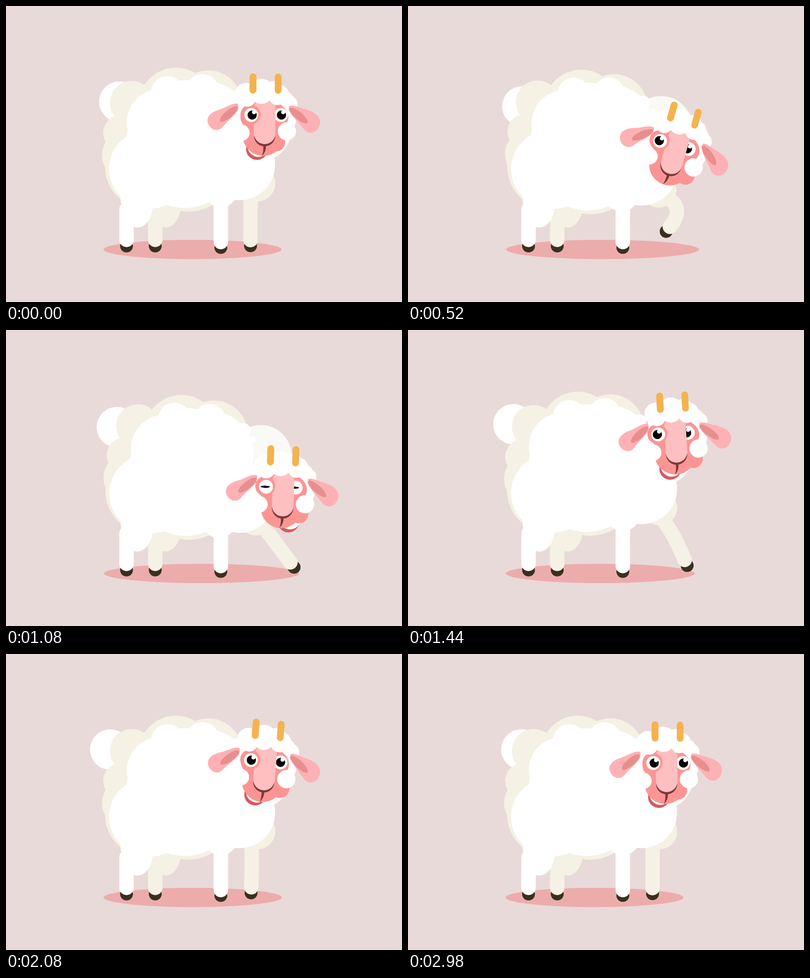
Recreate the animation shown at these times as an HTML page. Size 800 px wide and 600 px high, loop 3000 ms.

```html
<!DOCTYPE html>
<html lang="en">
<head>
<meta charset="utf-8">
<title>Sheep</title>
<style>
html, body { margin: 0; width: 100%; height: 100%; overflow: hidden; background: #e8dad9; }
svg { display: block; width: 100vw; height: 100vh; }
svg * { animation: 3s ease-in-out infinite; }

.white { fill: #fff; }
.cream { fill: #f5f1e4; }
.salmon { fill: #fb9594; }
.ear { fill: #fdb1b4; }
.inner { fill: #e88e8f; }
.horn { fill: #f4b34f; }
.hoof { fill: #38301f; }
.leg { fill: none; stroke: #fff; stroke-width: 29.3; stroke-linecap: round; }
.far { stroke: #f5f1e4; }

#shadow { animation-name: shadow; }
#body { transform-origin: 275px 335px; animation-name: lean; }
#tail { animation-name: wag; animation-timing-function: linear; }
#neck { animation-name: neck; }
#foreleg { animation-name: foreleg; }
#forehoof { animation-name: forehoof; }
#thigh { animation-name: thigh; }
#hindleg { animation-name: hindleg; }
#hindhoof { animation-name: hindhoof; }
#head { transform-origin: 522px 240px; animation-name: carry, tilt; }
#mouth { animation-name: chew; }
#chin { animation-name: chin; }
.turn { animation-name: turn; }
.eye { --turn: -7.8px; }
.horns { --turn: -4px; }
.look { --turn: -3.5px; }
.blink { transform-origin: 525px 221px; animation-name: blink; }

@keyframes shadow {
  0%, 72%, 100% { cx: 376.7px; rx: 179.8px; }
  17.33% { cx: 393px; rx: 195px; }
  31%, 37% { cx: 395px; rx: 197px; }
  48% { cx: 388.5px; rx: 190.8px; }
  58.67% { cx: 382.8px; rx: 185.4px; }
}
@keyframes lean {
  0% { rotate: 0deg; animation-timing-function: cubic-bezier(.4, 0, .8, .8); }
  17.33% { rotate: 3.15deg; animation-timing-function: ease-out; }
  31%, 36% { rotate: 5.1deg; }
  47%, 100% { rotate: 0deg; }
}
@keyframes wag {
  0%, 100% { translate: 0 0; }
  8% { translate: -14px 3px; }
  17.33% { translate: -5px 12px; }
  27% { translate: -13px 11px; }
  36% { translate: -17px 8px; }
  42% { translate: -22px 1px; }
  48% { translate: -16px -3px; }
  58.67% { translate: -6px 5.5px; }
  67% { translate: -19px 2px; }
  74% { translate: -17px -5px; }
  80% { translate: -8px -9px; }
  90% { translate: 1px -9px; }
}
@keyframes neck {
  0%, 48%, 75%, 100% { translate: 0 0; }
  17.33% { translate: -7px -18px; }
  36% { translate: -7px -16px; }
  59% { translate: -4px -6px; }
}
@keyframes foreleg {
  0%, 72%, 100% { d: path("M494 380C494 410 494 445 494 474.5"); }
  17.33% { d: path("M510 385C552 395 549 425 529 447.5"); }
  31%, 37% { d: path("M508.5 383C530 412 552 441 574.5 471"); }
  48% { d: path("M510 380C530 400 546 435 559 466"); }
  58.67% { d: path("M512 385C533 405 528 435 515 453.5"); }
}
@keyframes forehoof {
  0%, 72%, 100% { translate: 494px 486px; }
  17.33% { translate: 521.5px 457px; }
  31%, 37% { translate: 582px 481px; }
  48% { translate: 564px 477.5px; }
  58.67% { translate: 507.7px 464.2px; }
}
@keyframes thigh {
  0%, 73%, 89%, 100% { translate: 0 0; }
  80% { translate: 7px 3.5px; }
}
@keyframes hindleg {
  0%, 73%, 89%, 100% { d: path("M243.5 412Q243.5 444 243.5 474"); }
  80% { d: path("M252 414Q251 444 232 461"); }
}
@keyframes hindhoof {
  0%, 73%, 89%, 100% { translate: 243.5px 486.5px; }
  80% { translate: 223px 470px; }
}
@keyframes carry {
  0% { translate: 0 0; animation-timing-function: cubic-bezier(.4, 0, .8, .8); }
  17.33% { translate: 15px 61px; animation-timing-function: ease-out; }
  32%, 36% { translate: 37px 97.8px; }
  48% { translate: 18.8px -11.2px; }
  59% { translate: .4px -14.5px; }
  75%, 100% { translate: 0 0; }
}
@keyframes tilt {
  0%, 75%, 100% { rotate: 0deg; }
  17.33% { rotate: 16deg; }
  36% { rotate: 1.8deg; }
  48% { rotate: -3.3deg; }
  59% { rotate: 17deg; }
}
@keyframes turn {
  0%, 75%, 100% { translate: 0 0; }
  12%, 60% { translate: var(--turn) 0; }
}
@keyframes blink {
  0%, 32%, 40%, 100% { scale: 1 1; }
  35%, 37% { scale: 1 .24; }
}
@keyframes chew {
  0%, 69%, 98%, 100% { translate: 0 0; }
  17.33% { translate: 15px -11px; }
  27% { translate: 0 0; }
  36% { translate: 28px 0; }
  48% { translate: 1px 2px; }
  58.67% { translate: 25px 1px; }
  80%, 89% { translate: 20px 2px; }
}
@keyframes chin {
  0%, 98%, 100% { translate: -11px 2px; }
  14%, 89% { translate: 0 0; }
}
</style>
</head>
<body>
<svg viewBox="0 0 800 600">
  <ellipse id="shadow" cx="376.7" cy="493.5" rx="179.8" ry="19.5" fill="#edacac"/>

  <!-- far legs -->
  <circle class="hoof" cx="301.5" cy="486.5" r="13"/>
  <path class="leg far" d="M301.5 412V474"/>
  <path class="cream" d="M288 380C288 405 297 449 323 449C341 449 354 425 354 400V380Z"/>
  <circle class="hoof" id="forehoof" r="13"/>
  <path class="leg far" id="foreleg" d="M494 380C494 410 494 445 494 474.5"/>

  <g id="body">
    <circle class="white" id="tail" cx="229" cy="194" r="41"/>
    <g class="cream">
      <circle cx="343" cy="200" r="75"/>
      <circle cx="409" cy="198" r="67.5"/>
      <circle cx="254" cy="196" r="44"/>
      <circle cx="232" cy="257" r="35.7"/>
      <circle cx="246" cy="302" r="52"/>
      <circle cx="287" cy="325" r="87"/>
      <ellipse cx="368" cy="290" rx="110" ry="127"/>
      <circle cx="508" cy="360" r="36"/>
    </g>
    <circle id="neck" cx="513" cy="251" r="63.5" fill="#f9f9f5"/>
    <g class="white">
      <ellipse cx="291.6" cy="330" rx="83.6" ry="80.5"/>
      <ellipse cx="361" cy="280" rx="118" ry="129.5"/>
      <circle cx="312" cy="236" r="68"/>
      <circle cx="326" cy="175" r="33"/>
      <circle cx="397" cy="171" r="33"/>
      <circle cx="405" cy="240" r="87.5"/>
      <circle cx="467" cy="185" r="14"/>
      <circle cx="487" cy="202.5" r="7"/>
      <circle cx="472" cy="322" r="71.5"/>
      <circle cx="434" cy="374" r="34"/>
    </g>
  </g>

  <!-- near legs -->
  <circle class="hoof" id="hindhoof" r="13"/>
  <path class="leg" id="hindleg" d="M243.5 412Q243.5 444 243.5 474"/>
  <path class="white" id="thigh" d="M231 380C231 405 240 449 266 449C284 449 297 425 297 400V380Z"/>
  <circle class="hoof" cx="434" cy="489.5" r="13"/>
  <path class="leg" d="M434 390V478.5"/>

  <g id="head">
    <g class="white">
      <circle cx="525" cy="222" r="62"/>
      <circle cx="485" cy="179" r="23"/>
      <circle cx="516" cy="173" r="25.5"/>
      <circle cx="541" cy="172" r="20"/>
      <circle cx="553" cy="179" r="18.5"/>
      <circle cx="571" cy="199" r="18"/>
    </g>

    <g id="mouth">
      <circle cx="507" cy="290" r="22" fill="#d75a5c"/>
      <circle class="white" cx="510" cy="284" r="22"/>
    </g>
    <g class="salmon">
      <circle id="chin" cx="556" cy="274" r="19"/>
      <ellipse cx="522" cy="225" rx="48.5" ry="34"/>
      <ellipse cx="520" cy="262" rx="42" ry="42"/>
    </g>

    <!-- right eye sits behind the muzzle -->
    <g class="turn eye">
      <circle class="white" cx="555.5" cy="221" r="14"/>
      <g class="turn look">
        <circle class="blink" cx="556.5" cy="221" r="9.3"/>
        <circle class="white" cx="560" cy="215.3" r="4"/>
      </g>
    </g>

    <circle cx="522.5" cy="263" r="21.5" fill="#7b3839"/>
    <path d="M519.5 282H525Q526 296 517 304Q521 294 519.5 282Z" fill="#7b3839"/>
    <rect x="500.8" y="185" width="43.6" height="95" rx="21.8" fill="#fdbfc0"/>

    <g class="turn eye">
      <circle class="salmon" cx="494" cy="220" r="20.3"/>
      <circle class="white" cx="495.5" cy="221" r="14"/>
      <g class="turn look">
        <circle class="blink" cx="497.3" cy="221" r="9.3"/>
        <circle class="white" cx="501" cy="215.3" r="4"/>
      </g>
    </g>

    <g class="white">
      <circle cx="475.5" cy="257" r="16.7"/>
      <circle cx="567.5" cy="254" r="18.5"/>
      <circle cx="487" cy="186" r="18"/>
      <circle cx="516" cy="176" r="22.5"/>
      <circle cx="548" cy="184" r="17"/>
      <circle cx="566" cy="188" r="14"/>
    </g>

    <path class="ear" d="M468 198C457 196 445 205.5 431 210C412 216 404 226 408 238C413 251 428 256 437 246C447 233 462 222 468 212C470 206 470 200 468 198Z"/>
    <ellipse class="inner" cx="450" cy="219" rx="23" ry="7.5" transform="rotate(-40 450 219)"/>
    <path class="ear" d="M572 203C580 199 590 205.5 602 208.5C625 214 637 225 634 240C630 256 615 262 604 252C594 240 576 222 571 210Z"/>
    <ellipse class="inner" cx="591" cy="222" rx="23.5" ry="7.5" transform="rotate(40 591 222)"/>

    <g class="horn turn horns">
      <rect x="492" y="136.5" width="14" height="41" rx="6.9"/>
      <rect x="543" y="137" width="13.6" height="41" rx="6.8"/>
    </g>
  </g>
</svg>
</body>
</html>
```
